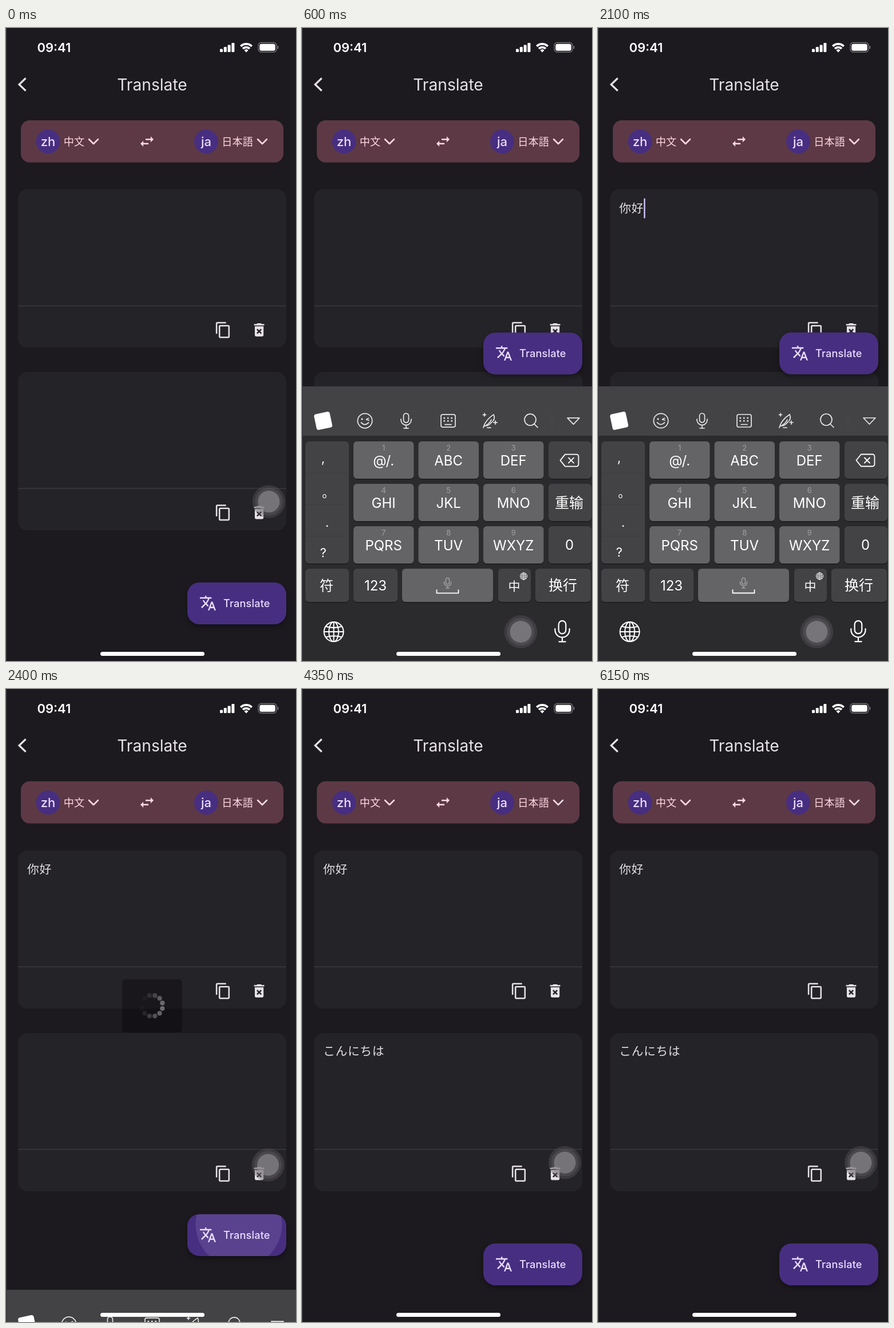
Animation, 507 px wide and 1104 px high, one loop 6300 ms. Source, as an HTML page:

```html
<!DOCTYPE html>
<html lang="en">
<head>
<meta charset="utf-8">
<title>Translate</title>
<style>
  html, body { margin: 0; width: 100%; height: 100%; overflow: hidden; background: #1c1a1f; }
  svg { position: fixed; left: 0; top: 0; width: 100%; height: 100%; display: block; }
  text { font-family: Inter, "Noto Sans CJK SC", "Noto Sans CJK JP", sans-serif; white-space: pre; }
  .ja { font-family: "Noto Sans CJK JP", "Noto Sans CJK SC", sans-serif; }
  .line { fill: none; stroke-linecap: round; stroke-linejoin: round; }
  #fab { filter: drop-shadow(0 4px 4px rgba(0, 0, 0, .35)); }
</style>
</head>
<body>
<svg id="stage" viewBox="0 0 507 1104"></svg>
<script>
const LOOP = 6300, STEP = 150;
const INK = '#e5e1e6', PINK = '#ffd9e3', LILAC = '#eaddff', PURPLE = '#472e80';
const DARK = '#434245', LIGHT = '#646366', ORANGE = '#ff5b29';
const KB_TOP = 625, KB_HEIGHT = 479;

const ICON = {
  swap: 'M6.99 11L3 15l3.99 4v-3H14v-2H6.99v-3zM21 9l-3.99-4v3H10v2h7.01v3L21 9z',
  copy: 'M16 1H4c-1.1 0-2 .9-2 2v14h2V3h12V1zm3 4H8c-1.1 0-2 .9-2 2v14c0 1.1.9 2 2 2h11c1.1 0 2-.9 2-2V7c0-1.1-.9-2-2-2zm0 16H8V7h11v14z',
  trash: 'M6 19c0 1.1.9 2 2 2h8c1.1 0 2-.9 2-2V7H6v12zm2.46-7.12l1.41-1.41L12 12.59l2.12-2.12 1.41 1.41L13.41 14l2.12 2.12-1.41 1.41L12 15.41l-2.12 2.12-1.41-1.41L10.59 14l-2.13-2.12zM15.5 4l-1-1h-5l-1 1H5v2h14V4z',
  translate: 'M12.87 15.07l-2.54-2.51.03-.03c1.74-1.94 2.98-4.17 3.71-6.53H17V4h-7V2H8v2H1v1.99h11.17C11.5 7.92 10.44 9.75 9 11.35 8.07 10.32 7.3 9.19 6.69 8h-2c.73 1.63 1.73 3.17 2.98 4.56l-5.09 5.02L4 19l5-5 3.11 3.11.76-2.04zM18.5 10h-2L12 22h2l1.12-3h4.75L21 22h2l-4.5-12zm-2.62 7l1.62-4.33L19.12 17h-3.24z'
};

// Shape helpers; text is placed by its vertical centre
const rect = (x, y, w, h, r, fill, more = '') =>
  `<rect x="${x}" y="${y}" width="${w}" height="${h}" rx="${r}" fill="${fill}" ${more}/>`;
const disc = (x, y, r, fill, more = '') => `<circle cx="${x}" cy="${y}" r="${r}" fill="${fill}" ${more}/>`;
const line = (d, color, w = 2, more = '') =>
  `<path class="line" d="${d}" stroke="${color}" stroke-width="${w}" ${more}/>`;
const text = (x, y, s, size, fill, more = '') =>
  `<text x="${x}" y="${y + size * .36}" font-size="${size}" fill="${fill}" ${more}>${s}</text>`;
const mid = (x, y, s, size, fill = '#fff', more = '') => text(x, y, s, size, fill, `text-anchor="middle" ${more}`);
const icon = (name, x, y, fill) =>
  `<path transform="translate(${x} ${y}) scale(1.275)" d="${ICON[name]}" fill="${fill}"/>`;
const chevron = (x, y, r, color, w) => line(`M${x - r} ${y - r / 2}l${r} ${r}l${r} ${-r}`, color, w);

const mic = (x, y, s, color, w) => `<g transform="translate(${x} ${y}) scale(${s})">` +
  line('M-4.5 -8.5a4.5 4.5 0 0 1 9 0v7a4.5 4.5 0 0 1 -9 0zM-9 -3v1.5a9 9 0 0 0 18 0V-3M0 7.5V13M-4 13H4', color, w / s) + '</g>';

const globe = (x, y, r, w) => `<g transform="translate(${x} ${y}) scale(${r})">` +
  line('M-1 0H1M0 -1V1M-.82 -.55Q0 -.3 .82 -.55M-.82 .55Q0 .3 .82 .55', '#fff', w / r) +
  `<circle r="1" fill="none" stroke="#fff" stroke-width="${w / r}"/>` +
  `<ellipse rx=".5" ry="1" fill="none" stroke="#fff" stroke-width="${w / r}"/></g>`;

const key = (x, y, w, h, fill) => rect(x, y + 1.5, w, h, 6, '#1b1a1c') + rect(x, y, w, h, 6, fill);

function statusBar() {
  const bars = [0, 1, 2, 3].map(i => rect(374 + i * 6.8, 36.5 - i * 3.5, 5, 5.5 + i * 3.5, 1.3, '#fff')).join('');
  return text(54.5, 34, '09:41', 22, '#fff', 'font-weight="600"') + bars +
    '<path class="line" style="stroke-linecap:butt" d="M410.3 31.8a14 14 0 0 1 19.4 0M414 36a8.6 8.6 0 0 1 12 0" stroke="#fff" stroke-width="3.7"/>' +
    '<path d="M420 42.5l-3.6-3.7a5.2 5.2 0 0 1 7.2 0z" fill="#fff"/>' +
    rect(441, 25.5, 32, 16.5, 5, 'none', 'stroke="#77757a" stroke-width="1.3"') +
    rect(443.3, 27.8, 27.4, 12, 3.2, '#fff') + rect(474.5, 31, 1.8, 5.5, 1, '#77757a');
}

const language = (x, code, name, chevronX, more) =>
  disc(x, 198, 21, PURPLE) + mid(x, 198, code, 22, LILAC, 'font-weight="500"') +
  text(x + 27.3, 198.2, name, 18.2, PINK, more) + chevron(chevronX, 198, 8, PINK, 2.5);

const card = (y, body) => rect(21, y, 469, 276, 16, '#242327') + rect(21, y + 202.3, 469, 1.5, 0, '#3b393e') +
  icon('copy', 364.3, y + 230, INK) + icon('trash', 427.3, y + 229.7, INK) + body;

function toolbar() {
  const c = '#e8e8e9', w = 1.7, y = 685;
  const dots = [0, 1, 2, 3, 4, 5].map(i => rect(247.5 + i % 3 * 6.5, 679 + (i / 3 | 0) * 5, 2.5, 2.5, 0, c)).join('');
  return rect(23, 671, 28, 28, 4, '#fff', 'transform="rotate(-12 37 685)"') +
    disc(110, y, 12.7, 'none', `stroke="${c}" stroke-width="${w}"`) + disc(105, 682, 1.6, c) +
    line('M112.5 682.5l4 -2M113 683l4 1M103.5 688q6 7 13 0', c, w) + mic(182, y, 1, c, w) +
    rect(243, 674, 25, 22, 3, 'none', `stroke="${c}" stroke-width="${w}"`) + dots + line('M250 691.5h11', c, w) +
    line('M317 697q3 -13 18 -23q4 8 -4 14q-4 6 -12 6M320 694q8 -4 11 -11M324 697h6M319 672v5M316.500 674.500h5M338 685v6M335 688h6', c, w) +
    disc(399, 683, 10, 'none', `stroke="${c}" stroke-width="${w}"`) + line('M406 690.500l6 6', c, w) +
    line('M437 668v34', '#4b4a4d', 1) + line('M464 680h21l-10.500 11z', c, w);
}

function keyboard() {
  let s = rect(0, KB_TOP, 507, 520, 0, '#2b2a2d') + rect(0, KB_TOP, 507, 86, 0, DARK);
  s += key(6, 721, 76, 213, DARK);
  for (let i = 1; i < 4; i++) s += line(`M8 ${721 + i * 55}h72`, '#3d3c3f', 1);
  const names = ['', 'ABC', 'DEF', 'GHI', 'JKL', 'MNO', 'PQRS', 'TUV', 'WXYZ'];
  names.forEach((name, i) => {
    const x = 90 + i % 3 * 113.5, y = 721 + (i / 3 | 0) * 74;
    s += key(x, y, 105.5, 65, LIGHT) + mid(x + 52.7, y + 11.5, i + 1, 13, '#a09fa2') + mid(x + 52.7, y + 33, name, 24);
  });
  for (let i = 0; i < 3; i++) s += key(431, 721 + i * 74, 75, 65, DARK);
  s += line('M460 743.500h20a3.500 3.500 0 0 1 3.500 3.500v14a3.500 3.500 0 0 1 -3.500 3.500h-20l-8.500 -10.500zM466 749.500l9 9M475 749.500l-9 9', '#fff', 1.8);
  s += mid(467, 828, '重输', 25) + mid(467.5, 901.5, '0', 24);
  s += key(6, 943, 76, 58, DARK) + mid(43, 972, '符', 24) + key(90, 943, 77, 58, DARK) + mid(128.5, 972, '123', 24);
  s += key(175, 943, 159, 58, LIGHT) + mic(254.500, 968, .68, '#a3a2a5', 1.5) +
    line('M235.500 980v5.500h38v-5.500', '#fff', 1.8);
  s += key(343, 943, 57, 58, DARK) + mid(371, 973, '中', 21) + globe(387.500, 956, 6, .9);
  s += globe(55.500, 1053, 17, 2) + mic(455, 1052, 1.4, '#fff', 2.2);

  const list = (items, x, size) => items.map((c, i) => mid(x, 749.5 + i * 55, c, size)).join('');
  s += '<g id="idle">' + toolbar() + list([',', '', '', '?'], 37, 22) + mid(46, 810, '。', 22) +
    mid(44, 862, '.', 22) + mid(142.7, 754, '@/.', 24) + key(408, 943, 97, 58, DARK) + mid(456, 972, '换行', 25) + '</g>';
  s += '<g id="compose">' + text(8, 642, '', 20, '#fff', 'id="pinyin"');
  for (let i = 0; i < 5; i++) s += text(i ? 21 + i * 88 : 17, 685, '', 26, i ? '#fff' : ORANGE, 'class="cand"');
  s += line('M453 668v34', '#545356', 1) + chevron(481, 685, 9, '#fff', 1.6) + list(['mi', 'ni', 'o', 'm'], 44, 22) +
    mid(142.7, 754, '分词', 25) + key(408, 943, 97, 58, ORANGE) + mid(456, 972, '确定', 25) + '</g>';
  return s;
}

function loader() {
  let s = rect(203, 506.5, 105, 92.5, 6, '#040206');
  for (let i = 0; i < 12; i++) {
    const a = (15 + i * 30) * Math.PI / 180;
    s += disc(255.5 + 18.5 * Math.sin(a), 552.5 - 18.5 * Math.cos(a), 4.1, '#fff', 'class="dot"');
  }
  return s;
}

const field = (y, s, id, more = '') => text(37, y, s, 20.8, INK, `id="${id}" letter-spacing=".65" ${more}`);

const $ = id => document.getElementById(id);
$('stage').innerHTML =
  '<defs><clipPath id="fabClip"><rect width="173" height="73" rx="21"/></clipPath></defs>' +
  rect(0, 0, 507, 1104, 0, '#1c1a1f') + statusBar() +
  line('M34.500 87.500L23 98.500l11.500 11', INK, 3.2, 'style="stroke-linecap:butt;stroke-linejoin:miter"') +
  mid(255.5, 98.5, 'Translate', 28.2, INK) +
  rect(26, 161, 459, 73.5, 15.5, '#5d3945') +
  language(73.5, 'zh', '中文', 153, '') + icon('swap', 231.2, 182.7, PINK) +
  language(350, 'ja', '日本語', 448, 'class="ja"') +
  card(281.5, field(315, '你好', 'input') + rect(35.8, 297, 2.6, 35, 1.3, '#c9b8ee', 'id="cursor"')) +
  card(600, field(632, 'こんにちは', 'output', 'class="ja"')) +
  '<g id="fab">' + rect(0, 0, 173, 73, 21, PURPLE) +
  `<g clip-path="url(#fabClip)">${disc(90, 18, 0, LILAC, 'id="ripple"')}</g>` +
  icon('translate', 20.7, 20.7, LILAC) +
  text(63, 36.7, 'Translate', 18.2, LILAC, 'font-weight="500" letter-spacing=".13"') + '</g>' +
  `<g id="loader">${loader()}</g><g id="keyboard">${keyboard()}</g>` +
  '<g id="touch">' + disc(0, 0, 28.7, 'rgba(90,88,94,.4)') + disc(0, 0, 24, 'rgba(110,108,112,.3)') +
  disc(0, 0, 19, 'rgba(150,148,152,.57)') + '</g>' +
  rect(165, 1088, 182, 7, 3.5, '#fff') + rect(0, 0, 1.2, 1104, 0, '#37353a');

const dots = document.querySelectorAll('.dot'), cands = document.querySelectorAll('.cand');
const typing = [
  [750, 'n', '你 那 哦 吗 能'],
  [900, 'ni', '你 米 呢 泥 密'],
  [1050, "ni'h", '你好 你还 你和 你会 你逛'],
  [1500, "ni'ha", '你好 你还 你哈 你海 你含'],
  [1650, "ni'hao", '你好 你号 拟好 你 呢']
];
const COMMIT = 1950, DISMISS = 2198, RESULT = 3900;

// Critically damped spring from 0 to 1
const spring = (ms, w) => { const x = Math.max(0, ms) * w / 1000; return 1 - (1 + x) * Math.exp(-x); };
const raised = (t, start, w) => spring(t - start, w) - spring(t - DISMISS, w);
const clamp = v => Math.min(1, Math.max(0, v));
const show = (id, on) => $(id).setAttribute('display', on ? 'inline' : 'none');
const move = (id, x, y) => $(id).setAttribute('transform', `translate(${x} ${y})`);

function draw(t) {
  move('keyboard', 0, (1 - raised(t, 0, 18.26)) * KB_HEIGHT);
  move('fab', 317, 967 - 436 * raised(t, 35, 18.26));
  const k = raised(t, 0, 29.6);
  move('touch', 459.5 - 77 * k, 826 + 227 * k);

  const now = t < COMMIT && typing.filter(s => s[0] <= t).pop();
  show('compose', now);
  show('idle', !now);
  if (now) {
    $('pinyin').textContent = now[1];
    now[2].split(' ').forEach((c, i) => { cands[i].textContent = c; });
  }

  show('input', t >= COMMIT);
  show('output', t >= RESULT);
  const blink = t >= COMMIT ? t - COMMIT : t - 100;
  show('cursor', t > 0 && t < DISMISS && blink % 1000 < 500);
  $('cursor').setAttribute('x', t >= COMMIT ? 80 : 35.8);

  const age = t - DISMISS;
  $('ripple').setAttribute('r', age > 0 ? 25 + age * .25 : 0);
  $('ripple').setAttribute('opacity', .115 * clamp((500 - age) / 250));

  show('loader', t > 2340 && t < RESULT);
  $('loader').setAttribute('opacity', clamp((t - 2335) / 190));
  const peak = 12 + (t - 3300) * .3;
  dots.forEach((d, i) => d.setAttribute('opacity', (1 + Math.cos((15 + i * 30 - peak) * Math.PI / 180)) / 2));
}

const begin = performance.now();
function tick() {
  const t = (performance.now() - begin) % LOOP;
  draw(Math.floor(t / STEP) * STEP);
  requestAnimationFrame(tick);
}
tick();
</script>
</body>
</html>
```
